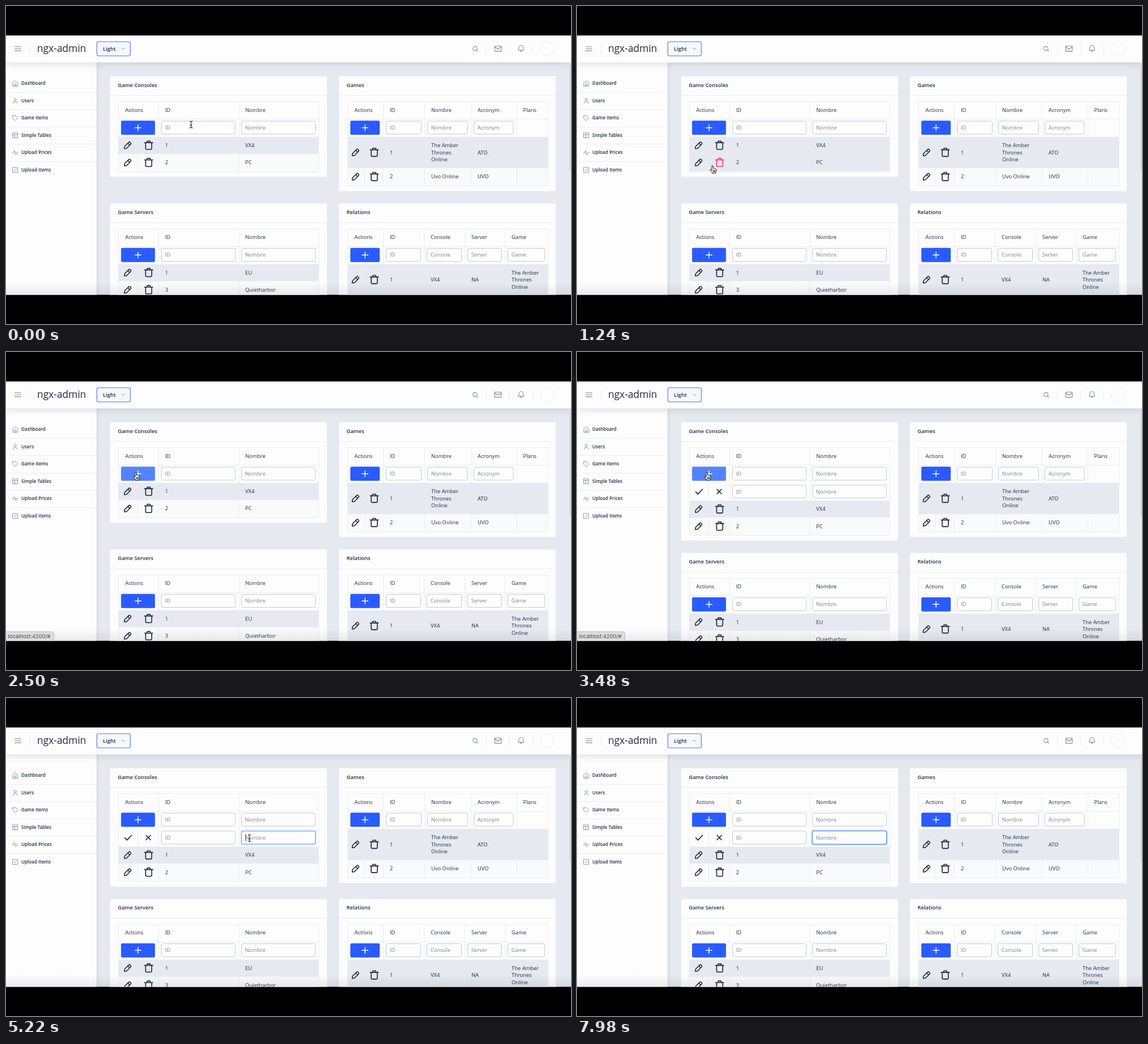
Recreate the animation shown at these times as an HTML page with a canvas. Size 998 by 561 pixels, loop 8000 ms.

```html
<!DOCTYPE html>
<html lang="es">
<head>
<meta charset="utf-8">
<title>Admin tables</title>
<style>
html, body { margin: 0; width: 100%; height: 100%; overflow: hidden; background: #000; }
canvas { display: block; }
</style>
</head>
<body>
<canvas id="stage" width="998" height="561"></canvas>
<script>
const ctx = document.getElementById('stage').getContext('2d');
const LOOP = 8000;
const C = {
  page: '#e6eaf0', white: '#fdfdfe', even: '#f9fafc', line: '#e8edf5',
  ink: '#222b45', icon: '#1b2036', hint: '#7d8188', muted: '#7f8aa3',
  blue: '#2a5bff', hover: '#5383ff', red: '#f0386b', box: '#c3c8d0'
};
const SANS = '"Open Sans", sans-serif';
const BODY = '9.4px ' + SANS;
const HEAD = '600 9.4px ' + SANS;

// times in ms
const T = { status: 1450, create: 3050, focus: 5170, type: 6600, erase: 7300 };
const TRACK = [
  [0, 327, 209], [250, 327, 209], [1050, 239, 282], [1400, 239, 282],
  [2050, 229, 213], [4000, 229, 213], [4850, 430, 247]
];

function fill(x, y, w, h, color) {
  ctx.fillStyle = color;
  ctx.fillRect(x, y, w, h);
}

function text(s, x, y, color = C.ink, font = BODY) {
  ctx.font = font;
  ctx.fillStyle = color;
  ctx.fillText(s, x, y + 3.3);
}

function round(x, y, w, h, r, bg, border, lw = 1) {
  ctx.beginPath();
  ctx.roundRect(x, y, w, h, r);
  if (bg) { ctx.fillStyle = bg; ctx.fill(); }
  if (border) { ctx.strokeStyle = border; ctx.lineWidth = lw; ctx.stroke(); }
}

function pen(d, x, y, color, lw = 1, bg) {
  const path = new Path2D(d);
  ctx.save();
  ctx.translate(x, y);
  ctx.lineCap = ctx.lineJoin = 'round';
  if (bg) { ctx.fillStyle = bg; ctx.fill(path); }
  ctx.strokeStyle = color;
  ctx.lineWidth = lw;
  ctx.stroke(path);
  ctx.restore();
}

const hLine = (x, y, w) => fill(x, Math.round(y), w, 1, C.line);
const vLine = (x, y, h) => fill(Math.round(x), y, 1, h, C.line);

const ICON = {
  home: 'M-4.5 4.5V-.8L0-4.8 4.5-.8V4.5ZM-1.4 4.5V1H1.4V4.5',
  person: 'M-2-2.4A2 2 0 1 0 2-2.4A2 2 0 1 0-2-2.4M-3.5 4.6V4A3.5 3 0 0 1 3.5 4V4.6',
  tag: 'M-4.4-4.2L.2-4.6 4.6-.2 0 4.6-4.7 0ZM-2.2-2.2h.1',
  layout: 'M-4.3-4.3H4.3V4.3H-4.3ZM-4.3-1.4H4.3M-1-1.4V4.3',
  activity: 'M-5 .6H-3L-1.2-3.6 1.2 3.6 2.8-.4H5',
  check: 'M-4.3-4.3H4.3V4.3H-4.3ZM-2 0L-.5 1.5 2.1-1.6',
  menu: 'M-5.5-3.6H5.5M-5.5 0H5.5M-5.5 3.6H5.5',
  search: 'M-4.2-.5A3.6 3.6 0 1 0 3-.5A3.6 3.6 0 1 0-4.2-.5M2.1 2.1L4.4 4.4',
  mail: 'M-5.8-4.6H5.8V4.6H-5.8ZM-5.6-3L0 1 5.6-3',
  bell: 'M-5 3C-3.7 1.6-3.8.2-3.8-1.5A3.8 3.8 0 0 1 3.8-1.5C3.8.2 3.7 1.6 5 3ZM-1.5 3.4A1.5 1.7 0 0 0 1.5 3.4',
  chevron: 'M-2.6-1.2L0 1.4 2.6-1.2',
  pencil: 'M-6 6L-5.5 2 2-5.4Q3-6.3 4-5.4L5.4-4Q6.3-3 5.4-2L-2 5.5ZM.2-3.5L3.5-.2',
  trash: 'M-7.2-4.6H7.2M-5.4-4.6V5.6Q-5.4 7.2-3.8 7.2H3.8Q5.4 7.2 5.4 5.6V-4.6M-2.8-4.6V-6.4Q-2.8-7.4-1.8-7.4H1.8Q2.8-7.4 2.8-6.4V-4.6',
  ok: 'M-6 .3L-2 4.3 6-4.3',
  cancel: 'M-4-4L4 4M4-4L-4 4',
  plus: 'M-5.3 0H5.3M0-5.3V5.3',
  beam: 'M-2.6-6Q0-6 0-4.8Q0-6 2.6-6M0-4.8V4.8M-2.6 6Q0 6 0 4.8Q0 6 2.6 6M-1.4 1.4H1.4',
  arrow: 'M0 0V11L2.6 8.6 4.3 12.4 6 11.7 4.3 8H7.8Z',
  hand: 'M-1 1Q-1-.4.2-.4Q1.4-.4 1.4 1V4.2Q3.2 3.4 3.6 4.8Q5.2 4.2 5.5 5.5Q7 5.1 7 6.8V9Q7 10.6 6 11.8V13H-.2V11.8L-3.6 7.8Q-4.3 6.6-3.2 6.2Q-2.4 5.9-1 7.5ZM1.6 7.8V10.8M3.2 7.8V10.8M4.8 7.8V10.8'
};

const MENU = [
  ['home', 'Dashboard'], ['person', 'Users'], ['tag', 'Game Items'],
  ['layout', 'Simple Tables'], ['activity', 'Upload Prices'], ['check', 'Upload Items']
];

const GAME = ['The Amber', 'Thrones', 'Online'];
const LEFT = [198, 269, 410.5, 552];
const CARDS = {
  consoles: { title: 'Game Consoles', x: 183, cols: LEFT, heads: ['ID', 'Nombre'],
    rows: [['1', 'VX4'], ['2', 'PC']] },
  games: { title: 'Games', x: 587, cols: [603, 666, 739, 821, 901.5, 957],
    heads: ['ID', 'Nombre', 'Acronym', 'Plans'],
    rows: [['1', GAME, 'ATO', ''], ['2', 'Uvo Online', 'UVO', '']] },
  servers: { title: 'Game Servers', x: 183, cols: LEFT, heads: ['ID', 'Nombre'],
    rows: [['1', 'EU'], ['3', 'Quietharbor']] },
  relations: { title: 'Relations', x: 587, cols: [603, 666, 738, 810, 881, 957],
    heads: ['ID', 'Console', 'Server', 'Game'],
    rows: [['1', 'VX4', 'NA', GAME]] }
};

const rowHeight = row => row.some(Array.isArray) ? 55.2 : 30.3;

function cursorAt(t) {
  let i = 0;
  while (i < TRACK.length - 2 && t > TRACK[i + 1][0]) i++;
  const [a, b] = [TRACK[i], TRACK[i + 1]];
  const u = Math.min(1, Math.max(0, (t - a[0]) / (b[0] - a[0])));
  const e = u * u * (3 - 2 * u);
  return { x: a[1] + (b[1] - a[1]) * e, y: a[2] + (b[2] - a[2]) * e };
}

const inside = (p, x0, y0, x1, y1) => p.x >= x0 && p.x < x1 && p.y >= y0 && p.y < y1;

function input(x, x2, y, hint, focus) {
  if (focus) {
    const k = Math.min(1, focus.age / 180);
    round(x - .5, y - 12, x2 - x + 1, 24, 3, null, `rgba(90,145,255,${.45 * k})`, 3.5);
    round(x, y - 11.5, x2 - x, 23, 2.5, C.white, '#5b97f7', 1.1);
  } else {
    round(x, y - 11.5, x2 - x, 23, 2.5, C.white, C.box);
  }
  const value = focus ? focus.value : '';
  text(value || hint, x + 6.3, y, value ? C.ink : C.hint);
  if (focus && focus.caret) {
    ctx.font = BODY;
    fill(x + 7 + ctx.measureText(value).width, y - 6, 1, 12, '#222');
  }
}

function inputs(card, y, focus) {
  card.heads.forEach((head, i) => {
    if (head === 'Plans') return;
    input(card.cols[i + 1] + 5.5, card.cols[i + 2] - 5.5, y, head, i === 1 ? focus : null);
  });
}

function drawCard(card, y, t, mouse, live) {
  const { cols } = card;
  const x0 = cols[0], x1 = cols[cols.length - 1], w = x1 - x0;
  const narrow = cols[1] - x0 < 65;
  const mid = narrow ? 633 : 232;
  const pencilX = narrow ? 617.5 : 215, trashX = narrow ? 650.5 : 252;
  const creating = live && t >= T.create;
  const top = y + 45;
  const bodyTop = top + 63 + (creating ? 31.2 : 0);
  const bottom = bodyTop + card.rows.reduce((s, r) => s + rowHeight(r), 0);

  const cardH = card === CARDS.servers || card === CARDS.relations ? 300 : bottom + 11 - y;
  round(card.x + .5, y + .5, 384, cardH - 1, 2.5, C.white, '#e0e8f2');
  text(card.title, card.x + 14.6, y + 16.6, C.ink, HEAD);
  hLine(card.x, y + 34, 385);

  const over = live && inside(mouse, 203, top + 34, 263, top + 59);
  round(x0 + 5.2, top + 34.3, cols[1] - x0 - 11, 25, 2.5, over ? C.hover : C.blue);
  pen(ICON.plus, (x0 + cols[1] - .5) / 2, top + 46.8, '#fff', 1.4);
  text('Actions', x0 + 12.6, top + 15.5);
  card.heads.forEach((h, i) => text(h, cols[i + 1] + 12, top + 15.5));
  inputs(card, top + 46.5);

  let ry = bodyTop;
  card.rows.forEach((row, r) => {
    const h = rowHeight(row), cy = ry + h / 2 - .4;
    const hot = live && inside(mouse, x0, ry, x1, ry + h);
    const shaded = r % 2 === 0 || hot;
    fill(x0, ry, w, h, shaded ? C.page : C.even);
    if (!shaded) {
      vLine(mid, ry, h);
      cols.slice(1, -1).forEach(x => vLine(x, ry, h));
    }
    pen(ICON.pencil, pencilX, cy, C.icon, 1.5);
    const danger = hot && mouse.x > 232 && mouse.x < 269;
    pen(ICON.trash, trashX, cy, danger ? C.red : C.icon, 1.6);
    row.forEach((cell, i) => {
      const lines = [].concat(cell);
      lines.forEach((s, n) => text(s, cols[i + 1] + 12, cy + (n - (lines.length - 1) / 2) * 12.5));
    });
    ry += h;
  });

  if (creating) {
    const cy = top + 78.3;
    pen(ICON.ok, 215.8, cy, C.icon, 1.6);
    pen(ICON.cancel, 251.3, cy, C.icon, 1.6);
    vLine(mid, top + 63, 31);
    const since = Math.max(T.focus, t >= T.type ? T.type : 0, t >= T.erase ? T.erase : 0);
    inputs(card, cy, t < T.focus ? null : {
      age: t - T.focus,
      value: t >= T.type && t < T.erase ? 'P' : '',
      caret: (t - since) % 1000 < 500
    });
  }

  hLine(x0, top, w);
  hLine(x0, top + 31, w);
  hLine(x0, bottom, w);
  vLine(x0, top, bottom - top);
  vLine(x1, top, bottom - top);
  cols.slice(1, -1).forEach(x => vLine(x, top, bodyTop - top));
}

function shadowBox(x, y, w, h, dx, dy, blur) {
  ctx.save();
  ctx.shadowColor = 'rgba(44,51,73,.13)';
  ctx.shadowOffsetX = dx;
  ctx.shadowOffsetY = dy;
  ctx.shadowBlur = blur;
  fill(x, y, w, h, C.white);
  ctx.restore();
}

function drawSidebar() {
  shadowBox(0, 99, 160, 411, 1, 2, 6);
  MENU.forEach(([icon, label], i) => {
    const y = 136 + i * 30.5;
    pen(ICON[icon], 16.3, y + .7, C.muted, .9);
    text(label, 27, y - .3, C.ink, '600 8.15px ' + SANS);
    if (i < MENU.length - 1) hLine(0, y + 15.5, 160);
  });
}

function drawHeader() {
  shadowBox(0, 52, 998, 47.5, 0, 4, 10);
  pen(ICON.menu, 21, 75.3, C.muted, 1.1);
  text('ngx-admin', 55, 77.7, C.ink, '17.4px ' + SANS);
  round(160.5, 63, 59, 25, 2.5, '#f5f8fc', '#4a76f5', 1.1);
  text('Light', 171.3, 75.5, C.ink, HEAD);
  pen(ICON.chevron, 207.3, 75.5, C.muted);
  [42, 848, 889, 930].forEach(x => vLine(x, 67, 17));
  pen(ICON.search, 829, 75.5, C.muted, 1.1);
  pen(ICON.mail, 869, 75.3, C.muted, 1.1);
  pen(ICON.bell, 909.8, 75, C.muted, 1.1);
  ctx.beginPath();
  ctx.arc(955.7, 75.6, 12, 0, 7);
  ctx.strokeStyle = '#e9edf3';
  ctx.lineWidth = 1;
  ctx.stroke();
}

function drawStatus() {
  round(-2, 493.5, 86.5, 18, [0, 3, 0, 0], '#dcdee1', '#b4b7bb');
  text('localhost:4200/#', 3.6, 501.3, '#44474c', '9.3px Inter, sans-serif');
}

function drawCursor(t, mouse) {
  if (t >= T.type) return;
  const { x, y } = mouse;
  const made = t >= T.create;
  const field = [[203, 226]].concat(made ? [[235, 258]] : [])
    .some(([a, b]) => inside(mouse, 274, a, 405, b) || inside(mouse, 415, a, 546, b));
  const link = inside(mouse, 198, 202, 269, made ? 322 : 291);
  if (field) {
    pen(ICON.beam, x, y, 'rgba(255,255,255,.8)', 2.4);
    pen(ICON.beam, x, y, '#222', 1.1);
  } else {
    pen(link ? ICON.hand : ICON.arrow, x, y, '#111', 1, '#fff');
  }
}

function draw(t) {
  const mouse = cursorAt(t);
  const shift = t >= T.create ? 6 : 0;
  fill(0, 0, 998, 561, '#000');
  ctx.save();
  ctx.beginPath();
  ctx.rect(0, 52, 998, 457.5);
  ctx.clip();
  fill(0, 52, 998, 458, C.page);
  drawCard(CARDS.consoles, 123, t, mouse, true);
  drawCard(CARDS.games, 123, t, mouse);
  drawCard(CARDS.servers, 347.5 + shift, t, mouse);
  drawCard(CARDS.relations, 347.5 + shift, t, mouse);
  drawSidebar();
  drawHeader();
  round(995, 101, 3, 189, 1.5, '#d6dbe3');

  const shade = ctx.createLinearGradient(0, 488, 0, 510);
  shade.addColorStop(0, 'rgba(40,45,55,0)');
  shade.addColorStop(1, 'rgba(40,45,55,.09)');
  fill(0, 488, 998, 22, shade);

  if (t >= T.status && inside(mouse, 198, 202, 269, 322)) drawStatus();
  drawCursor(t, mouse);
  ctx.restore();
}

const start = performance.now();
function tick() {
  draw((performance.now() - start) % LOOP);
  requestAnimationFrame(tick);
}
tick();
</script>
</body>
</html>
```
